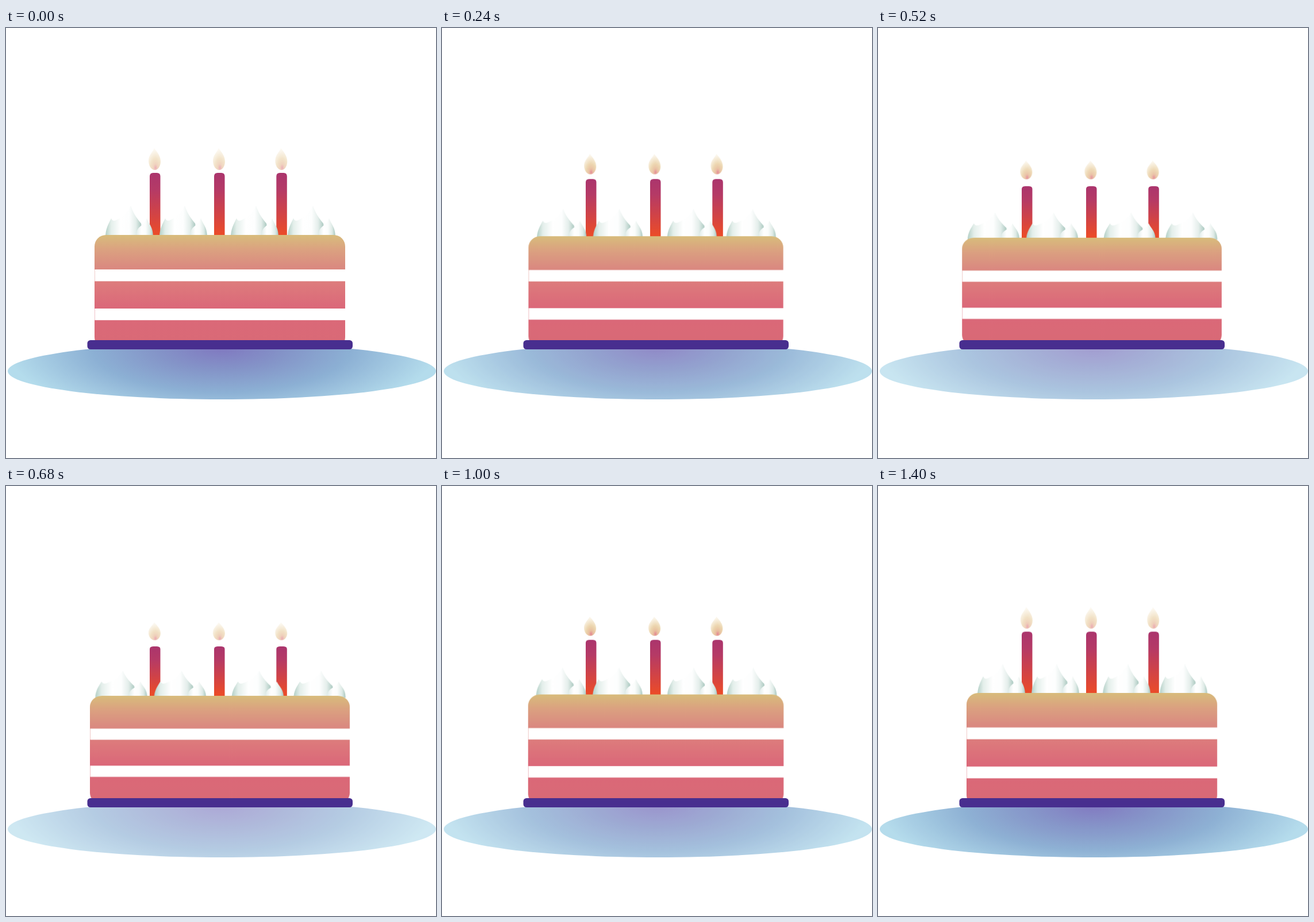
Write an HTML page that moves like this. It is 748 px wide and 748 px high and loops after 1440 ms.

```html
<!DOCTYPE html>
<html lang="en">
<head>
<meta charset="utf-8">
<title>Birthday cake</title>
<style>
  html, body { margin: 0; width: 100%; height: 100%; overflow: hidden; background: #fff; }
  svg { display: block; width: 100vw; height: 100vh; }
  .cake, .cream, .candles, .flames, .glow, .plate {
    animation: 1440ms linear infinite;
  }
  .cake    { transform-origin: 372px 459px; animation-name: squash; }
  .cream   { transform-origin: 372px 396px; animation-name: spread; }
  .candles { transform-origin: 372px 370px; animation-name: shrink; }
  .flames  { transform-origin: 372px 247px; animation-name: drop; }
  .glow    { animation-name: flicker; animation-duration: 720ms; }
  .plate   { animation-name: fade; }

  @keyframes squash {
    0%, 94.44%, 100% { transform: scale(1, 1); }
    41.67% { transform: scale(1.041, .944); }
  }
  @keyframes spread {
    0%, 94.44%, 100% { transform: scale(1, 1); }
    41.67% { transform: scale(1.099, .845); }
  }
  @keyframes shrink {
    0%, 100% { transform: scaleY(1); }
    44.44% { transform: scaleY(.7585); }
  }
  @keyframes drop {
    0%, 100% { transform: translateY(0) scaleY(1); }
    50% { transform: translateY(22.5px) scaleY(.81); }
  }
  @keyframes flicker {
    0%, 100% { opacity: .6; transform: translateX(0); }
    50% { opacity: 1; transform: translateX(-1.2px); }
  }
  @keyframes fade {
    0%, 100% { opacity: 1; }
    48% { opacity: .64; }
  }
</style>
</head>
<body>
<svg viewBox="0 0 748 748" xmlns="http://www.w3.org/2000/svg">
  <defs>
    <linearGradient id="sponge" x2="0" y2="1">
      <stop offset="0" stop-color="#d8bc7c"/>
      <stop offset=".13" stop-color="#dba180"/>
      <stop offset=".28" stop-color="#da8a80"/>
      <stop offset=".43" stop-color="#dd7a7c"/>
      <stop offset=".64" stop-color="#db6879"/>
      <stop offset="1" stop-color="#d96a76"/>
    </linearGradient>
    <linearGradient id="wax" x2="0" y2="1">
      <stop offset="0" stop-color="#ab356d"/>
      <stop offset=".25" stop-color="#b53a66"/>
      <stop offset=".9" stop-color="#ea4b2a"/>
    </linearGradient>
    <linearGradient id="swirl">
      <stop offset="0" stop-color="#b4d0c7"/>
      <stop offset=".16" stop-color="#e4efeb"/>
      <stop offset=".42" stop-color="#fff"/>
      <stop offset=".66" stop-color="#fdfefe"/>
      <stop offset=".84" stop-color="#e4eeeb"/>
      <stop offset="1" stop-color="#a9c8bf"/>
    </linearGradient>
    <linearGradient id="dab">
      <stop offset="0" stop-color="#e2edea"/>
      <stop offset=".3" stop-color="#fff"/>
      <stop offset=".55" stop-color="#fbfdfc"/>
      <stop offset=".8" stop-color="#dfebe7"/>
      <stop offset="1" stop-color="#a9c8bf"/>
    </linearGradient>
    <radialGradient id="fire" cx=".58" cy=".9" r=".85">
      <stop offset="0" stop-color="#d9566a" stop-opacity=".8"/>
      <stop offset=".2" stop-color="#dc9a6c" stop-opacity=".72"/>
      <stop offset=".5" stop-color="#dcb26a" stop-opacity=".6"/>
      <stop offset="1" stop-color="#e2c07c" stop-opacity=".15"/>
    </radialGradient>
    <radialGradient id="dish" gradientUnits="userSpaceOnUse" cx="0" cy="0" r="1"
      gradientTransform="translate(375 556) scale(375 130)">
      <stop offset="0" stop-color="#8078c0"/>
      <stop offset=".3" stop-color="#8494c8"/>
      <stop offset=".6" stop-color="#8cb0d4"/>
      <stop offset="1" stop-color="#b4dcec"/>
    </radialGradient>
    <g id="puff">
      <path fill="url(#swirl)" d="M173 364C173 350 178 341 183 331C185 336 188 336 192 334C205 328 213 318 217 309C221 321 226 329 235 340C237 350 236 358 230 364Z"/>
      <path fill="url(#dab)" d="M227 364C225 343 239 347 245 331C249 342 256 346 256 364Z"/>
    </g>
    <path id="candle" fill="url(#wax)" d="M250 370V258Q250 252 256 252H262.5Q268.5 252 268.5 258V370Z"/>
    <path id="flame" fill="url(#fire)" d="M258 209C262 215 269 222 269 232C269 241 264 247 259 247C253 247 248 240 248 231C248 221 255 216 258 209Z"/>
  </defs>

  <ellipse class="plate" cx="375.5" cy="597" rx="372.5" ry="49" fill="url(#dish)"/>

  <g class="candles">
    <use href="#candle"/>
    <use href="#candle" x="112"/>
    <use href="#candle" x="220.3"/>
  </g>

  <g class="cream">
    <use href="#puff"/>
    <use href="#puff" x="94"/>
    <use href="#puff" x="218"/>
    <use href="#puff" x="317"/>
  </g>

  <g class="cake">
    <rect x="154" y="360" width="436" height="198" rx="20" fill="url(#sponge)"/>
    <path fill="#fff" d="M154.4 420H591V440.5H154.4ZM154.4 488H591V508.3H154.4Z"/>
  </g>

  <rect x="141.5" y="543" width="461.5" height="16" rx="5.5" fill="#482e8f"/>

  <g class="flames">
    <g class="glow">
      <use href="#flame"/>
      <use href="#flame" x="112"/>
      <use href="#flame" x="220.3"/>
    </g>
  </g>
</svg>
</body>
</html>
```
